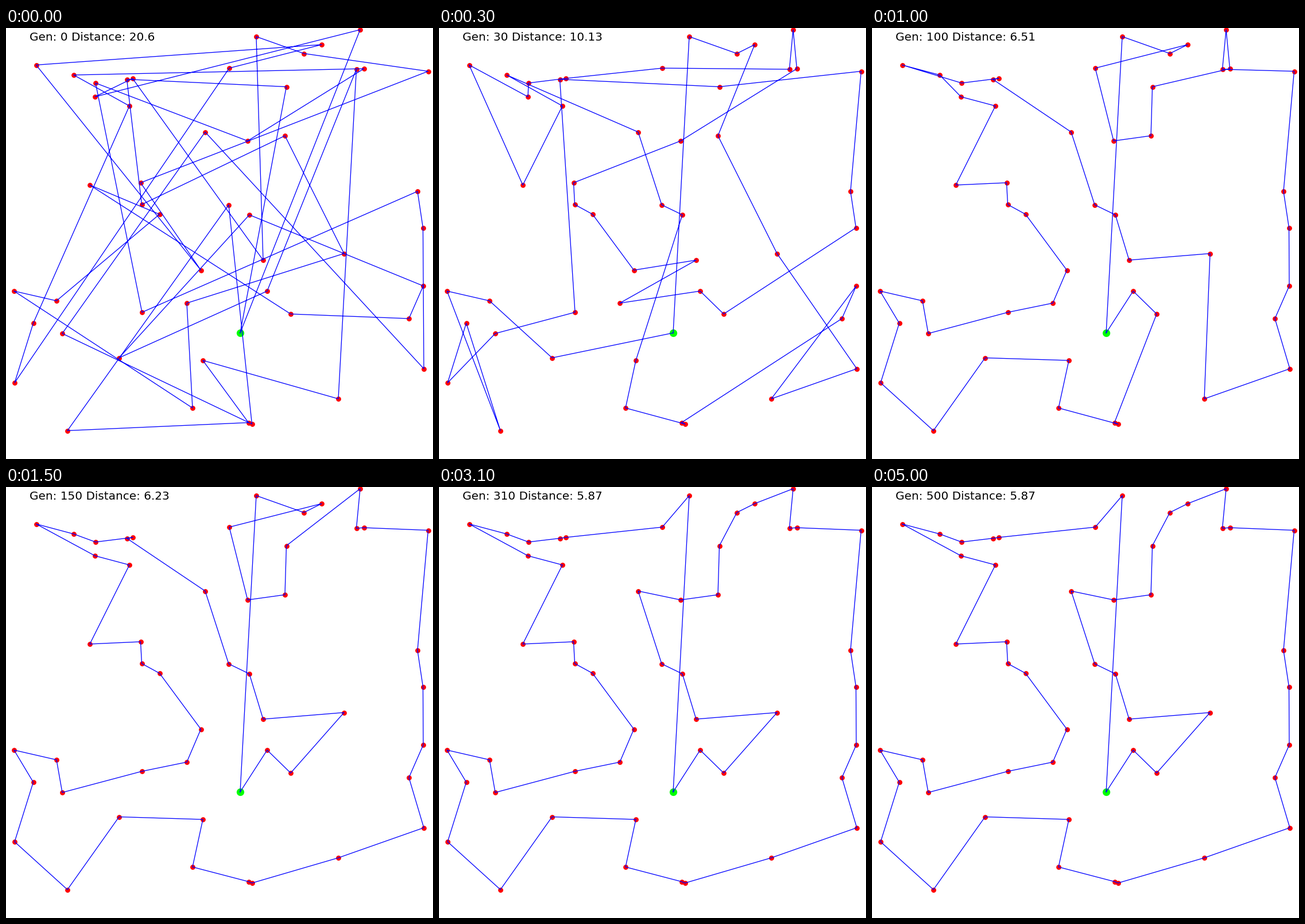
Recreate the animation shown at these times as a matplotlib script. Size 744x752 px, loop 5100 ms.

```python
import numpy as np
import matplotlib.pyplot as plt
from matplotlib.animation import FuncAnimation

W, H, DPI = 744, 752, 100
PX = 72 / DPI
FRAMES, INTERVAL = 51, 100
UNIT = 743.9  # pixels per unit of distance
DEPOT = "*"
NAMES = "ABCDEFGHIJKLMNOPQRSTUVWXYZabcdefghijklmnopqrstuvw"

# Cities, named in the order of the best tour
SPOTS = [
    (436, 15), (389, 70), (220.5, 88), (210.5, 89.5), (156, 96), (118, 82),
    (52.5, 64.5), (155, 120), (215, 136), (146, 274), (234.5, 270),
    (236.5, 308), (267.5, 325), (339.5, 422.5), (315, 480), (237, 496),
    (98, 533), (88, 476), (14, 459), (47.5, 515), (15, 619), (107, 702.5),
    (197, 575.5), (343, 580), (325, 663), (422.5, 688.5), (428.5, 691),
    (579, 647), (728, 594.5), (702, 507), (727, 450), (726.5, 348.5),
    (717, 285), (735.5, 75.5), (623.5, 71), (610.5, 72), (617, 3), (550, 29),
    (519, 44.5), (488.5, 102.5), (486, 188), (421, 197), (347, 181.5),
    (388, 308.5), (424, 326), (448, 405), (589, 393.5), (496, 499), (455, 459),
]
CITY = dict(zip(NAMES, SPOTS))
CITY[DEPOT] = (408, 532)

# Frame at which a tour is reached; "p-n" stands for every city from p to n
STAGES = [
    (0, "kHCtAmhKNGlBUTIFipEPgfcqQarVZXbjwWsedvJMRSYOuoLDn"),
    (3, "AmloucbedZaYXsrqFIJGHECBjkip K-N tOwv f-h nDPQUTVSRW"),
    (10, "AmlB p-n ikj h-b u-q DCEGF H-Y aZvw"),
    (17, "AB p-E CD q-w"),
    (26, "AB p-E CD q-w"),
    (27, "A-w"),
]


def span(first, last):
    i, j = NAMES.index(first), NAMES.index(last)
    return NAMES[i:j + 1] if i <= j else NAMES[j:i + 1][::-1]


def expand(text):
    tour, *parts = text.replace(" ", "").split("-")
    for part in parts:
        tour += span(tour[-1], part[0])[1:] + part[1:]
    return tour


def points(tour):
    return np.array([CITY[c] for c in tour], float)


def length(tour):
    return np.hypot(*np.diff(points(tour + DEPOT), axis=0).T).sum()


def edges(tour):
    ring = DEPOT + tour + DEPOT
    return {frozenset(pair) for pair in zip(ring, ring[1:])}


def flip(tour, i, j):
    return tour[:i] + tour[i:j + 1][::-1] + tour[j + 1:]


def refine(tour, goal):
    """Reverse stretches of the tour towards the goal, keeping improvements."""
    wanted = edges(goal)
    kept, floor = [tour], length(goal)
    while True:
        now = edges(tour)
        shared = len(now & wanted)
        moves = set()
        for a, b in zip(goal, goal[1:]):
            if frozenset((a, b)) not in now:
                i, j = sorted((tour.index(a), tour.index(b)))
                moves |= {flip(tour, i + 1, j), flip(tour, i, j - 1)}
        moves = [m for m in sorted(moves) if len(edges(m) & wanted) > shared]
        if not moves:
            return kept
        tour = min(moves, key=length)
        if floor < length(tour) < length(kept[-1]):
            kept.append(tour)


def timeline():
    stages = [(t, expand(text)) for t, text in STAGES]
    tours = []
    for (t0, a), (t1, b) in zip(stages, stages[1:]):
        steps = refine(a, b)
        tours += [steps[k * len(steps) // (t1 - t0)] for k in range(t1 - t0)]
    return tours + [stages[-1][1]] * (FRAMES - len(tours))


TOURS = timeline()

fig = plt.figure(figsize=(W / DPI, H / DPI), dpi=DPI, facecolor="white")
ax = fig.add_axes([0, 0, 1, 1])
ax.set_xlim(0, W)
ax.set_ylim(H, 0)
ax.axis("off")


def discs(names, radius, color):
    ax.plot(*points(names).T, "o", ms=2 * radius * PX, mew=0, color=color)


discs(NAMES, 4.4, "#ff0000")
discs(DEPOT, 6.6, "#00ff00")
route, = ax.plot([], [], color="#0000ff", lw=1.3 * PX, zorder=3,
                 solid_joinstyle="round")
label = ax.text(41, 21.5, "", family="DejaVu Sans", size=20 * PX,
                color="black", va="baseline", zorder=4)


def draw(frame):
    tour = TOURS[frame]
    route.set_data(*points(DEPOT + tour + DEPOT).T)
    label.set_text(f"Gen: {10 * frame} "
                   f"Distance: {round(float(length(tour) / UNIT), 2)}")
    return route, label


anim = FuncAnimation(fig, draw, frames=FRAMES, interval=INTERVAL,
                     repeat=True, repeat_delay=0)
plt.show()
```
